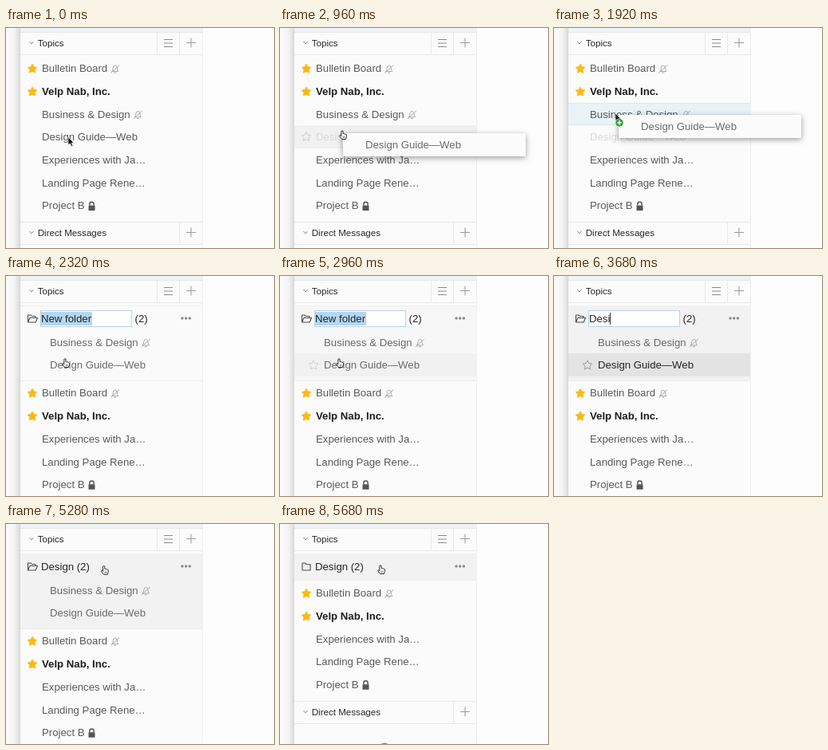
An HTML page with a canvas for the animation above (5.88 s loop, 336 by 276 pixels).

```html
<!DOCTYPE html>
<html lang="en">
<head>
<meta charset="utf-8">
<title>Topic folders</title>
<style>
html, body { margin: 0; width: 100%; height: 100%; overflow: hidden; background: #fdfdfd; }
canvas { display: block; width: 336px; height: 276px; }
</style>
</head>
<body>
<canvas id="stage" width="336" height="276"></canvas>
<script>
const ctx = document.getElementById('stage').getContext('2d');
const LOOP = 5880, STEP = 80;
const LEFT = 18, RIGHT = 246, ROW = 28.68;
const FONT = '"Liberation Sans", Arial, sans-serif';
const INK = '#5a5a5a', DARK = '#262626', FAINT = '#dadada', RULE = '#e9e9e9';

const T = {
  hover: 240, drag: 800, target: 1280, drop: 2080, folder: 2320, shade: 2960,
  type: 3200, enter: 4160, leave: 4480, sub: 4640, head: 5040, close: 5360
};

// time, x, y of the pointer tip
const PATH = [
  [0, 78, 137], [240, 78, 137], [400, 78, 129], [1040, 78, 129], [1280, 77, 107],
  [2160, 77, 107], [2320, 74, 104], [4480, 74, 104], [4640, 91, 86],
  [4880, 110, 61], [5040, 113, 55], [5360, 126, 52], [5880, 126, 52]
];

const TOPICS = [
  { text: 'Bulletin Board', star: true, muted: true },
  { text: 'Velp Nab, Inc.', star: true, bold: true },
  { text: 'Business & Design', muted: true },
  { text: 'Design Guide\u2014Web' },
  { text: 'Experiences with Ja\u2026' },
  { text: 'Landing Page Rene\u2026' },
  { text: 'Project B', locked: true }
];

const ramp = (t, from, len) => Math.max(0, Math.min(1, (t - from) / len));
const mix = (a, b, k) => a + (b - a) * k;

function rect(x, y, w, h, color) {
  ctx.fillStyle = color;
  ctx.fillRect(x, y, w, h);
}

function text(str, x, y, { size = 13.2, color = INK, bold = false } = {}) {
  ctx.font = `${bold ? 'bold ' : ''}${size}px ${FONT}`;
  ctx.fillStyle = color;
  ctx.fillText(str, x, y);
  return x + ctx.measureText(str).width;
}

function line(points, color, width = 1) {
  ctx.strokeStyle = color;
  ctx.lineWidth = width;
  ctx.beginPath();
  points.forEach(([x, y], i) => i ? ctx.lineTo(x, y) : ctx.moveTo(x, y));
  ctx.stroke();
}

function shape(x, y, d, fill, stroke, width = 1, scale = 1) {
  const path = new Path2D(d);
  ctx.save();
  ctx.translate(x, y);
  ctx.scale(scale, scale);
  if (fill) { ctx.fillStyle = fill; ctx.fill(path); }
  if (stroke) { ctx.strokeStyle = stroke; ctx.lineWidth = width; ctx.stroke(path); }
  ctx.restore();
}

function disc(x, y, r, color) {
  ctx.fillStyle = color;
  ctx.beginPath();
  ctx.arc(x, y, r, 0, Math.PI * 2);
  ctx.fill();
}

function star(x, y, fill, stroke) {
  ctx.beginPath();
  for (let i = 0; i < 10; i++) {
    const r = i % 2 ? 3.1 : 6.1, a = i * Math.PI / 5;
    ctx.lineTo(x + r * Math.sin(a), y - r * Math.cos(a));
  }
  ctx.closePath();
  ctx.lineJoin = 'round';
  ctx.lineWidth = 1;
  ctx.strokeStyle = stroke;
  if (fill) { ctx.fillStyle = fill; ctx.fill(); }
  ctx.stroke();
}

function bell(x, y) {
  shape(x, y, 'M-4 3H4Q2.6 1 2.6-1Q2.6-4.5 0-4.5Q-2.6-4.5-2.6-1Q-2.6 1-4 3ZM-1.5 4.7H1.5M-5.5 5L5.5-5', null, '#aaa');
}

function lock(x, y) {
  shape(x, y, 'M-4-1H4V5.5H-4Z', '#555');
  shape(x, y, 'M-2.6-1V-3Q-2.6-5.4 0-5.4Q2.6-5.4 2.6-3V-1', null, '#555', 1.5);
}

function folderIcon(x, y, open) {
  shape(x, y, open
    ? 'M-5.5 4.5V-4.5H-1.8L-.5-3H4V-1M-5.5 4.5L-3-1H6.5L4.2 4.5Z'
    : 'M-5 4.5V-4.5H-1.5L0-2.8H5V4.5Z', null, '#4c4c4c', 1.1);
}

function arrow(x, y) {
  shape(x, y, 'M0 0V10L2.4 7.9L4 11.6L5.8 10.8L4.2 7.2H7.2Z', '#111', '#fff', 0.7);
}

function hand(x, y) {
  shape(x, y, 'M-1.3 1Q-1.3-.3 0-.3Q1.2-.3 1.2 1V4.2Q2.2 3.5 3 4.5Q4.2 4 4.7 5Q6.2 4.8 6.2 6.3V8.5L5 12H-.3L-3.7 7.8Q-4 6.3-2.7 6.3L-1.3 7.6Z', '#fff', '#222', 1.1, 0.88);
  shape(x, y, 'M1.4 7.5V10.5M3.3 7.5V10.5', null, '#444', 0.8, 0.88);
}

function plus(x, y, r, color, width) {
  line([[x - r, y], [x + r, y]], color, width);
  line([[x, y - r], [x, y + r]], color, width);
}

function band(y, h, color, alpha = 1) {
  ctx.globalAlpha = alpha;
  rect(LEFT, y, RIGHT - LEFT, h, color);
  ctx.globalAlpha = 1;
}

function header(title, top, bottom, menu) {
  const mid = (top + bottom) / 2;
  band(top, 1, RULE);
  band(bottom, 1, RULE);
  rect(217, top, 1, bottom - top, RULE);
  line([[29.5, mid - 2], [32, mid + 1], [34.5, mid - 2]], '#888');
  text(title, 39.7, mid + 4, { size: 11.6, color: DARK });
  plus(232, mid - 0.5, 6, '#9a9a9a');
  if (!menu) return;
  rect(189, top, 1, bottom - top, RULE);
  for (const dy of [-5, -0.5, 4]) rect(198, mid + dy, 11, 1, '#8a8a8a');
}

function topic(item, mid, x = 45, color = INK) {
  if (item.star) star(33, mid + 0.3, '#fdb813', '#fdb813');
  const end = text(item.text, x, mid + 4.4, { bold: item.bold, color: item.bold ? '#1c1c1c' : color });
  if (item.muted) bell(end + 9.7, mid + 0.5);
  if (item.locked) lock(end + 9, mid + 0.5);
}

function backdrop() {
  rect(0, 0, 336, 276, '#fdfdfd');
  const g = ctx.createLinearGradient(0, 0, LEFT, 0);
  g.addColorStop(0, '#fbfbfb');
  g.addColorStop(0.6, '#f4f4f4');
  g.addColorStop(1, '#d8d8d8');
  rect(0, 0, LEFT, 276, g);
  band(0, 276, '#fbfbfb');
  band(0, 5, '#edf3f6');
  rect(RIGHT, 0, 1, 276, '#f0f0f0');
}

function flatList(t) {
  const dragging = t >= T.drag && t < T.drop;
  const over = t >= T.target && t < T.drop;
  const hover = ramp(t, T.hover - STEP, 240) * (1 - ramp(t, 1120, 160));
  if (hover) {
    band(122, 29, '#f1f1f1', hover);
    ctx.globalAlpha = hover;
    star(33, 136.5, null, '#cfcfcf');
    ctx.globalAlpha = 1;
  }
  if (over) {
    band(94, 28, '#e9f2f7');
    band(94, 1, '#d8e6ee');
    band(121, 1, '#d8e6ee');
  }
  TOPICS.forEach((item, i) => {
    topic(item, 51 + i * ROW, 45, i === 3 && dragging ? FAINT : INK);
  });
  header('Direct Messages', 243, 271);
}

function ghost(t) {
  const k = ramp(t, 1040, 240);
  const x = mix(79, 81, k), y = mix(132, 109, k);
  ctx.save();
  ctx.shadowColor = 'rgba(0,0,0,.38)';
  ctx.shadowBlur = 7;
  ctx.shadowOffsetY = 2;
  rect(x, y, 229, 29, '#fbfbfb');
  ctx.restore();
  text('Design Guide\u2014Web', x + 28, y + 19, { color: '#6c6c6c' });
}

function nameField(t) {
  rect(43, 43, 115, 21, '#b9d3de');
  rect(44, 44, 113, 19, '#fff');
  if (t < T.type) {
    rect(44, 45, 64, 17, '#b3d6f3');
    text('New folder', 44, 58.3, { color: DARK });
  } else {
    const typed = 'Design'.slice(0, 1 + Math.floor((t - T.type) / 160));
    const end = text(typed, 44, 58.3, { color: DARK });
    rect(Math.round(end), 46, 1, 15, '#333');
  }
  text('(2)', 161.5, 58.3, { color: DARK });
}

function folderList(t) {
  const closed = t >= T.close;
  const bottom = closed ? 70 : 131;
  const shade = mix(250, 242, ramp(t, T.shade - STEP, 240));
  band(37, bottom - 37, `rgb(${shade},${shade},${shade})`);
  band(37, 1, '#f0f0f0');
  band(bottom, 1, '#ececec');

  const guide = ramp(t, T.shade - STEP, 240) * (1 - ramp(t, T.leave, 160));
  const design = ramp(t, T.sub - STEP, 160) * (1 - ramp(t, T.head - STEP, 160));
  if (!closed) {
    if (guide) band(97, 29, '#e3e3e3', guide);
    if (design) band(69, 28, '#e3e3e3', design);
    topic(TOPICS[2], 83.5, 55, '#6a6a6a');
    topic(TOPICS[3], 112, 55, guide > 0.5 ? DARK : '#6a6a6a');
    if (guide) {
      ctx.globalAlpha = guide;
      star(42, 112, null, '#999');
      ctx.globalAlpha = 1;
    }
  }

  folderIcon(33, 53.5, !closed);
  if (t < T.enter) nameField(t);
  else text('Design (2)', 44, 58.3, { color: DARK });
  for (let i = 0; i < 3; i++) disc(221 + i * 4.7, 53, 1.7, '#898989');

  const first = closed ? 87 : 147.08;
  TOPICS.filter((_, i) => i !== 2 && i !== 3)
    .forEach((item, i) => topic(item, first + i * ROW));
  if (closed) {
    header('Direct Messages', 222, 250);
    disc(131, 282, 7.5, '#8a8a8a');
  }
}

function pointer(t) {
  if (t >= T.type && t < T.leave) return;
  const i = PATH.findIndex(p => p[0] > t);
  const a = PATH[i - 1], b = PATH[i];
  const k = (t - a[0]) / (b[0] - a[0]);
  const x = mix(a[1], b[1], k), y = mix(a[2], b[2], k);
  if (t >= T.hover && t < T.target || t >= T.folder) return hand(x, y);
  arrow(x, y);
  if (t >= T.target && t < T.drop) {
    disc(x + 5, y + 11.8, 5.3, '#fff');
    disc(x + 5, y + 11.8, 4.8, '#25a52d');
    plus(x + 5, y + 11.8, 2.7, '#fff', 1.5);
  }
}

function draw(t) {
  backdrop();
  header('Topics', 5, 33, true);
  if (t < T.folder) flatList(t);
  else folderList(t);
  if (t >= T.drag && t < T.drop) ghost(t);
  pointer(t);
}

const start = performance.now();
function tick() {
  const t = (performance.now() - start) % LOOP;
  draw(Math.min(Math.floor(t / STEP) * STEP, 5680));
  requestAnimationFrame(tick);
}
tick();
</script>
</body>
</html>
```
